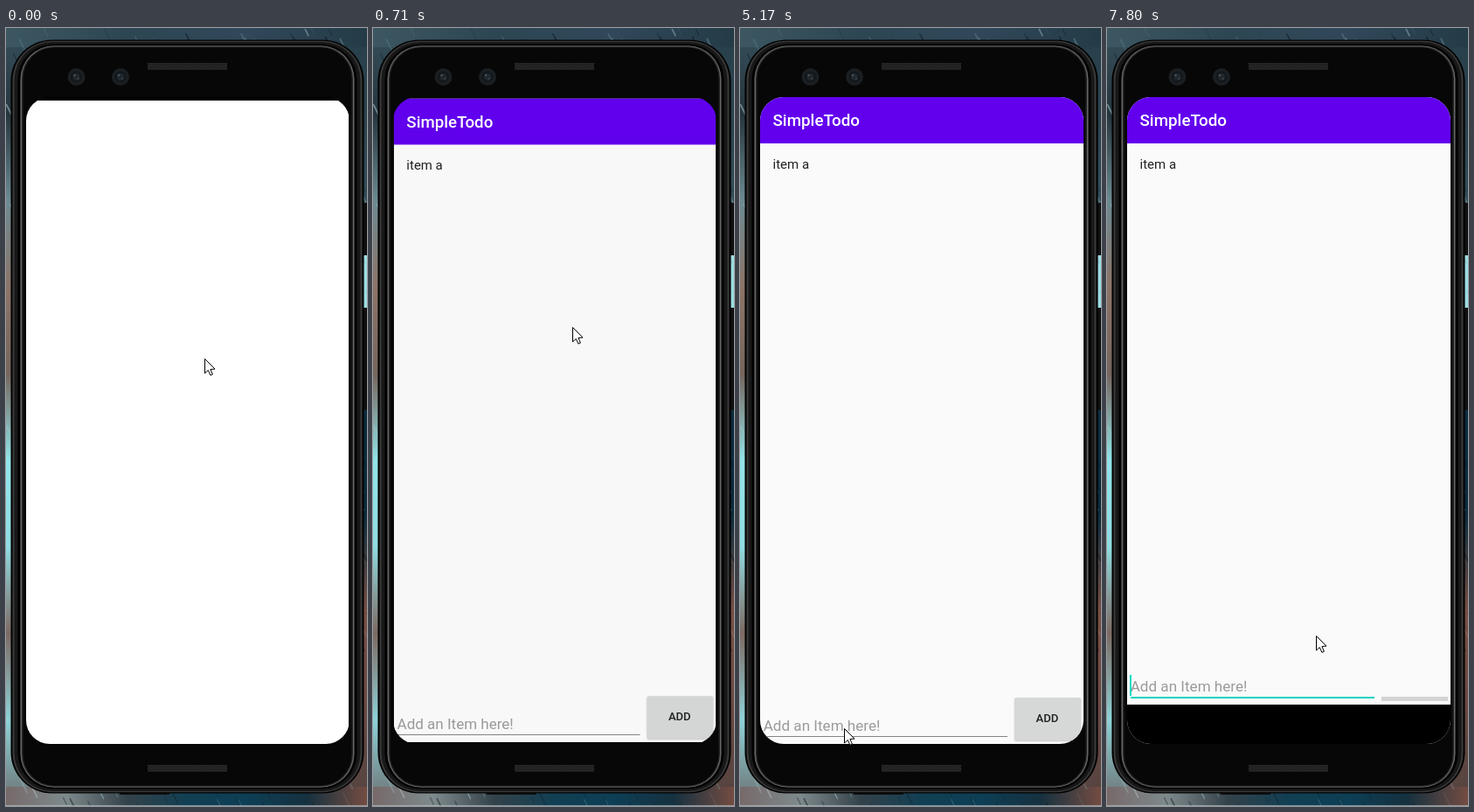
Write an HTML page with a canvas that moves like this. It is 413 px wide and 890 px high and loops after 8000 ms.

```html
<!DOCTYPE html>
<html lang="en">
<head>
<meta charset="utf-8">
<title>Todo app</title>
<style>
  html, body { margin: 0; width: 100%; height: 100%; overflow: hidden; background: #000; }
  canvas, div, span { position: absolute; }
  #phone, #over { left: 0; top: 0; }
  #screen { left: 23px; top: 79px; width: 370px; height: 740px; border-radius: 27px; overflow: hidden; background: #000; }
  #app { inset: 0; background: #fafafa; color: #212121; font: 15px Roboto, Arial, sans-serif; transform-origin: 185px 370px; }
  #app span { line-height: 20px; white-space: pre; }
  #bar { left: 0; top: 0; width: 370px; height: 52.5px; background: #6200ee; }
  #title { left: 14.5px; top: 17px; font-size: 18.8px; font-weight: 500; color: #fff; }
  #item { left: 14.5px; top: 66.5px; }
  #field { left: 0; top: 0; }
  #hint { left: 3.7px; top: 709px; font-size: 17.1px; color: #9b9b9b; }
  #line { left: 4px; top: 731px; width: 279px; height: 1px; background: #858585; }
  #field.focus #line { height: 2px; background: #12d3c0; }
  #caret { left: 3px; top: 706px; width: 2px; height: 24px; background: #03dac5; }
  #add { left: 290.5px; top: 687px; width: 76px; height: 49px; border-radius: 2px; background: #d6d7d7; box-shadow: 0 1px 2px rgba(0,0,0,.22); }
  #add span { left: 0; width: 100%; top: 14px; text-align: center; font-size: 13.1px; font-weight: 500; }
  #strip { left: 290.5px; top: 686px; width: 76px; height: 5px; background: #d3d4d3; }
  #keys { left: 0; top: 695px; width: 370px; height: 45px; background: #000; }
  #splash { left: 0; right: 1px; bottom: 0; background: #fff; }
</style>
</head>
<body>
<canvas id="phone" width="413" height="890"></canvas>
<div id="screen">
  <div id="app">
    <div id="bar"><span id="title">SimpleTodo</span></div>
    <span id="item">item a</span>
    <div id="add"><span>ADD</span></div>
    <div id="strip"></div>
    <div id="field">
      <span id="hint">Add an Item here!</span>
      <div id="line"></div>
      <div id="caret"></div>
    </div>
    <div id="keys"></div>
  </div>
  <div id="splash"></div>
</div>
<canvas id="over" width="413" height="890"></canvas>
<script>
const LOOP = 8000, W = 413, H = 890;
const $ = id => document.getElementById(id);
const clamp = v => Math.min(1, Math.max(0, v));

let seed = 11;
const rnd = () => (seed = (seed * 16807) % 2147483647) / 2147483647;

// evenly spaced colours blended along one axis
function band(g, x, y, w, h, colors) {
  const tall = h > w;
  const grad = g.createLinearGradient(x, y, tall ? x : x + w, tall ? y + h : y);
  colors.forEach((c, i) => grad.addColorStop(i / (colors.length - 1), c));
  g.fillStyle = grad;
  g.fillRect(x, y, w, h);
}

function streak(g, x, y, len, width, color) {
  g.strokeStyle = color;
  g.lineWidth = width;
  g.beginPath();
  g.moveTo(x, y);
  g.lineTo(x + len * .5, y + len);
  g.stroke();
}

function drawWallpaper(g) {
  band(g, 0, 0, 207, H, ['#36505c', '#26363e', '#6c8b92', '#8d7468', '#76665e', '#92e4e8', '#90dde2', '#7d6a63', '#8ed3d8', '#6a6d6e']);
  band(g, 207, 0, 206, H, ['#28404c', '#2b434e', '#35525c', '#16313f', '#0b2c3d', '#0b2c3d', '#7a5045', '#6a4a44', '#52423f']);
  band(g, 207, 260, 206, 60, ['#a9eef2', '#9cdde2']);
  band(g, 0, 0, W, 22, ['#3c5762', '#2d4653', '#30485a', '#243b47']);
  band(g, 0, 868, W, 22, ['#77696a', '#7d8a8c', '#34424a', '#123f53', '#0d3f55', '#16313f', '#744c42']);

  g.lineCap = 'round';
  for (let i = 0; i < 900; i++) {
    const tone = rnd() < .5 ? '8,20,28' : '185,222,230';
    streak(g, rnd() * W, rnd() * H, 5 + rnd() * 18, .7 + rnd() * 1.3, `rgba(${tone},${.1 + rnd() * .4})`);
  }
  g.fillStyle = 'rgba(190,205,208,.6)';
  g.fillRect(0, 889, W, 1);
}

function drawSpeaker(g, y) {
  g.fillStyle = '#1d1d1d';
  g.fillRect(162, y, 91, 8);
  g.fillStyle = '#353535';
  for (let r = 0; r < 4; r++)
    for (let x = 162 + r % 2; x < 253; x += 2) g.fillRect(x, y + r * 2, 1, 1);
}

function drawCamera(g, x, y) {
  const dot = (d, r, color) => {
    g.fillStyle = color;
    g.beginPath();
    g.arc(x + d, y + d, r, 0, 7);
    g.fill();
  };
  dot(0, 10, '#1b1f22');
  dot(0, 6.5, '#13181c');
  dot(0, 4, '#20282e');
  dot(-2, 1.2, '#4a555c');
  dot(2, 1.1, '#3c464d');
}

// one layer of the phone body, set in by d
function shell(g, d, color) {
  const top = 13.5 + d * .62;
  g.fillStyle = color;
  g.beginPath();
  g.roundRect(5.5 + d, top, 404 - 2 * d, 875.5 - d * .62 - top, 47 - d * .8);
  g.fill();
}

function drawPhone(g) {
  drawWallpaper(g);
  g.fillStyle = '#101010';
  g.fillRect(407, 200, 6, 60);
  g.fillRect(407, 320, 6, 117);
  g.fillRect(130, 873, 57, 4);

  shell(g, 0, '#000');
  shell(g, 2, '#3a3a3a');
  shell(g, 4, '#181818');
  shell(g, 8, '#000');
  shell(g, 11, '#666');
  shell(g, 12.5, '#262626');
  shell(g, 14, '#070707');

  drawSpeaker(g, 40);
  drawSpeaker(g, 843);
  drawCamera(g, 80.5, 56);
  drawCamera(g, 131, 56);
}

// curved pointer moves, shown as n evenly timed stops
const moves = [
  { start: 0, end: 450, n: 4, from: [227, 378], bend: [228, 378], to: [228, 376] },
  { start: 560, end: 860, n: 3, from: [228, 375], bend: [228, 330.5], to: [228, 332] },
  { start: 1150, end: 1750, n: 5, from: [222, 314], bend: [160, 180], to: [135, 159] },
  { start: 3400, end: 4440, n: 8, from: [212, 371], bend: [200, 812], to: [87, 159] },
  { start: 4590, end: 5170, n: 5, from: [90, 230], bend: [115, 790], to: [119, 801] },
  { start: 5770, end: 6470, n: 6, from: [140, 796], bend: [237, 730], to: [239, 695] }
];

function pointer(t) {
  const m = moves.filter(m => t >= m.start).pop();
  const last = m.n - 1;
  const u = Math.floor(clamp((t - m.start) / (m.end - m.start)) * last + .06) / last;
  return m.from.map((a, i) => Math.round((1 - u) ** 2 * a + 2 * u * (1 - u) * m.bend[i] + u * u * m.to[i]));
}

const arrow = [[0, 0], [0, 16.5], [3.8, 13], [6.4, 18.8], [8.9, 17.7], [6.4, 12], [11.5, 11.6]];

function drawPointer(g, [x, y]) {
  g.clearRect(0, 0, W, H);
  g.beginPath();
  for (const [dx, dy] of arrow) g.lineTo(x + .5 + dx, y + .5 + dy);
  g.closePath();
  g.fillStyle = '#fff';
  g.fill();
  g.strokeStyle = '#000';
  g.lineWidth = 1;
  g.stroke();
}

const show = (id, on) => { $(id).style.display = on ? 'block' : 'none'; };

function render(t) {
  show('splash', t < 560);
  $('splash').style.top = t < 150 ? '4px' : '0';

  // the app window opens in three steps, slowing down
  const rest = 1 - clamp(Math.floor((t - 560) / 150) / 2);
  const shrink = rest ** 3.3;
  $('app').style.transform = rest ? `translateY(${-1.5 * shrink}px) scale(${1 - .05 * shrink})` : 'none';
  $('app').style.opacity = 1 - .35 * rest ** 5.6;

  const keys = t >= 7800;
  show('keys', keys);
  show('strip', keys);
  show('add', !keys);
  $('field').style.top = keys ? '-45px' : '0';
  $('field').className = t >= 5470 ? 'focus' : '';
  show('caret', t >= 5770 && Math.floor((t - 5700) / 487.5) % 2 === 0);

  drawPointer(over, pointer(t));
}

const over = $('over').getContext('2d');
drawPhone($('phone').getContext('2d'));
const begin = performance.now();
function tick() {
  render((performance.now() - begin) % LOOP);
  requestAnimationFrame(tick);
}
tick();
</script>
</body>
</html>
```
